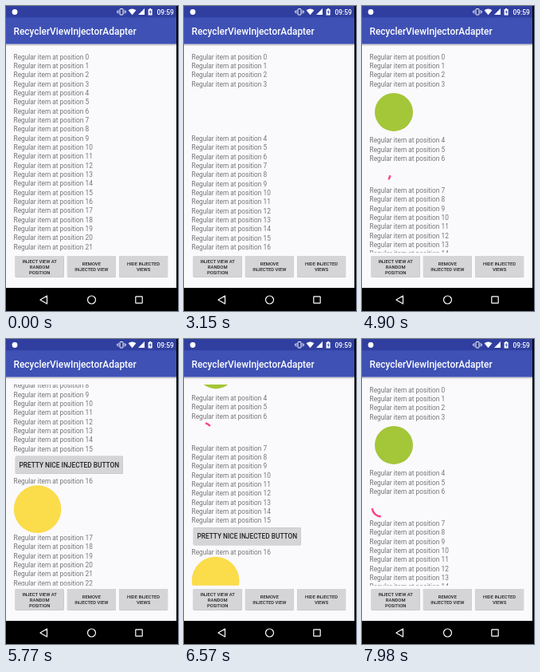
Recreate the animation shown at these times as an HTML page. Size 216x382 px, loop 8 s.

```html
<!DOCTYPE html>
<html lang="en">
<head>
<meta charset="utf-8">
<title>RecyclerViewInjectorAdapter</title>
<style>
  html, body { margin: 0; width: 100%; height: 100%; overflow: hidden; background: #fafafa; }
  svg { display: block; width: 216px; height: 382px; font: 8.33px Roboto, sans-serif; }
  .item { fill: #757575; }
  .button rect { fill: #d5d4d7; filter: drop-shadow(0 .7px .6px #0006); }
  .button text { fill: #212121; font-weight: 500; text-anchor: middle; }
  .small { font-size: 5.85px; }
</style>
</head>
<body>
<svg viewBox="0 0 216 382">
  <defs>
    <clipPath id="listArea"><rect y="57" width="216" height="251.8"/></clipPath>
    <linearGradient id="shade" x2="0" y2="1">
      <stop stop-color="#000" stop-opacity=".25"/><stop offset="1" stop-opacity="0"/>
    </linearGradient>
  </defs>
  <rect width="216" height="382" fill="#faf9fc"/>
  <g id="list" clip-path="url(#listArea)"></g>
  <g id="actions"></g>

  <rect y="47.6" width="216" height="3" fill="url(#shade)"/>
  <rect width="216" height="47.6" fill="#3f51b5"/>
  <rect width="216" height="14.3" fill="#303f9f"/>
  <g fill="#fff">
    <circle cx="11" cy="7.5" r="3.4"/>
    <rect x="143" y="3.6" width="4" height="7.4" rx=".7" fill="none" stroke="#fff"/>
    <path d="M141 5v4.6M149 5v4.6M139.6 6v2.6M150.4 6v2.6" stroke="#fff" stroke-width=".8"/>
    <path d="M153.6 5.2Q158.5 1.6 163.4 5.2L158.5 11.2Z"/>
    <path d="M174 3V11H166Z"/>
    <path d="M178.6 4h1.4v-1h2.2v1h1.4v7.4h-5Z"/>
    <path d="M181.6 4.8l-1.8 3h1.2v2.6l1.6-3.2h-1Z" fill="#303f9f"/>
    <text x="210.7" y="10.7" text-anchor="end" font-weight="500">09:59</text>
    <text x="9.5" y="35.6" font-size="11.9" font-weight="500">RecyclerViewInjectorAdapter</text>
  </g>

  <rect y="353" width="216" height="29"/>
  <rect x="214" width="2" height="382"/>
  <g fill="none" stroke="#fff" stroke-width="1.2">
    <path d="M51.5 363v10l-8.6-5Z" stroke-linejoin="round"/>
    <circle cx="107.5" cy="368" r="5"/>
    <rect x="162.8" y="363.8" width="8.4" height="8.4" rx=".5"/>
  </g>
</svg>
<script>
const LOOP = 8000, TOP = 57.6, LINE = 11.33, MOVE = 250, FADE = 120;
const list = document.getElementById('list');

function add(parent, tag, attrs = {}, text = '') {
  const el = document.createElementNS('http://www.w3.org/2000/svg', tag);
  for (const key in attrs) el.setAttribute(key, attrs[key]);
  el.textContent = text;
  parent.append(el);
  return el;
}

function addButton(parent, x, y, width, height, lines, lineHeight, className = '') {
  const g = add(parent, 'g', { class: 'button ' + className });
  add(g, 'rect', { x, y, width, height, rx: 1.2 });
  const first = y + height / 2 - (lines.length - 1) * lineHeight / 2 + lineHeight * .31;
  lines.forEach((line, i) =>
    add(g, 'text', { x: x + width / 2, y: first + i * lineHeight }, line));
}

[['INJECT VIEW AT', 'RANDOM', 'POSITION'], ['REMOVE', 'INJECTED VIEW'], ['HIDE INJECTED', 'VIEWS']]
  .forEach((lines, i) =>
    addButton(document.getElementById('actions'), 11.7 + 65.2 * i, 313, 61, 26.8, lines, 7, 'small'));

const items = Array.from({ length: 26 }, (_, i) =>
  add(list, 'text', { class: 'item', x: 9.5 }, 'Regular item at position ' + i));

// Each injected view sits behind the regular item that "after" returns.
const inject = (start, height, after) => ({ start, height, after, el: add(list, 'g') });
const injected = [
  inject(2933, 59.5, () => 3),
  inject(3800, 28.7, () => 6),
  inject(1230, 28.9, t => t < 4500 ? 17 : 15),
  inject(4600, 59.6, () => 16)
];
const [disc, spinner, button, face] = injected.map(view => view.el);
add(disc, 'circle', { cx: 40, cy: 30, r: 24, fill: '#a4c639' });
add(face, 'circle', { cx: 39.6, cy: 29.8, r: 29.8, fill: '#fbdc4a' });
addButton(button, 11.8, 3.7, 135, 22, ['PRETTY NICE INJECTED BUTTON'], 9.6);
const arc = add(spinner, 'path', { fill: 'none', stroke: '#ff4081', 'stroke-width': 2.4 });

const clamp = x => Math.min(1, Math.max(0, x));
const smooth = x => (1 - Math.cos(Math.PI * clamp(x))) / 2;

// cubic-bezier(.4, 0, .2, 1)
function fastOutSlowIn(x) {
  let lo = 0, hi = 1;
  for (let i = 0; i < 16; i++) {
    const u = (lo + hi) / 2, v = 1 - u;
    if (1.2 * u * v * v + .6 * u * u * v + u ** 3 < x) lo = u; else hi = u;
  }
  return lo * lo * (3 - 2 * lo);
}

function spinnerPath(t) {
  const d = t - 6570;
  const phase = ((d / 1350 + .085) % 1 + 1) % 1;
  const turn = -82.5 + .1281 * d - 9.35e-6 * d * d + 90 * phase;
  const from = turn + 270 * fastOutSlowIn(clamp(phase * 2 - 1));
  const to = turn + 270 * fastOutSlowIn(clamp(phase * 2)) + 10.8;
  const point = deg => {
    const a = deg * Math.PI / 180;
    return `${24 + 11.4 * Math.cos(a)} ${14.4 + 11.4 * Math.sin(a)}`;
  };
  return `M${point(from)}A11.4 11.4 0 ${+(to - from > 180)} 1 ${point(to)}`;
}

function draw(t) {
  const scroll = 184 * (smooth((t - 5300) / 470) - smooth((t - 6286) / 580));
  let y = TOP - scroll;
  items.forEach((item, i) => {
    item.setAttribute('y', y + 9);
    y += LINE;
    for (const view of injected) {
      if (view.after(t) !== i) continue;
      view.el.setAttribute('transform', `translate(0 ${y})`);
      view.el.setAttribute('opacity', clamp((t - view.start - MOVE) / FADE));
      y += view.height * smooth((t - view.start) / MOVE);
    }
  });
  arc.setAttribute('d', spinnerPath(t));
}

function tick() {
  draw(performance.now() % LOOP);
  requestAnimationFrame(tick);
}
tick();
</script>
</body>
</html>
```
